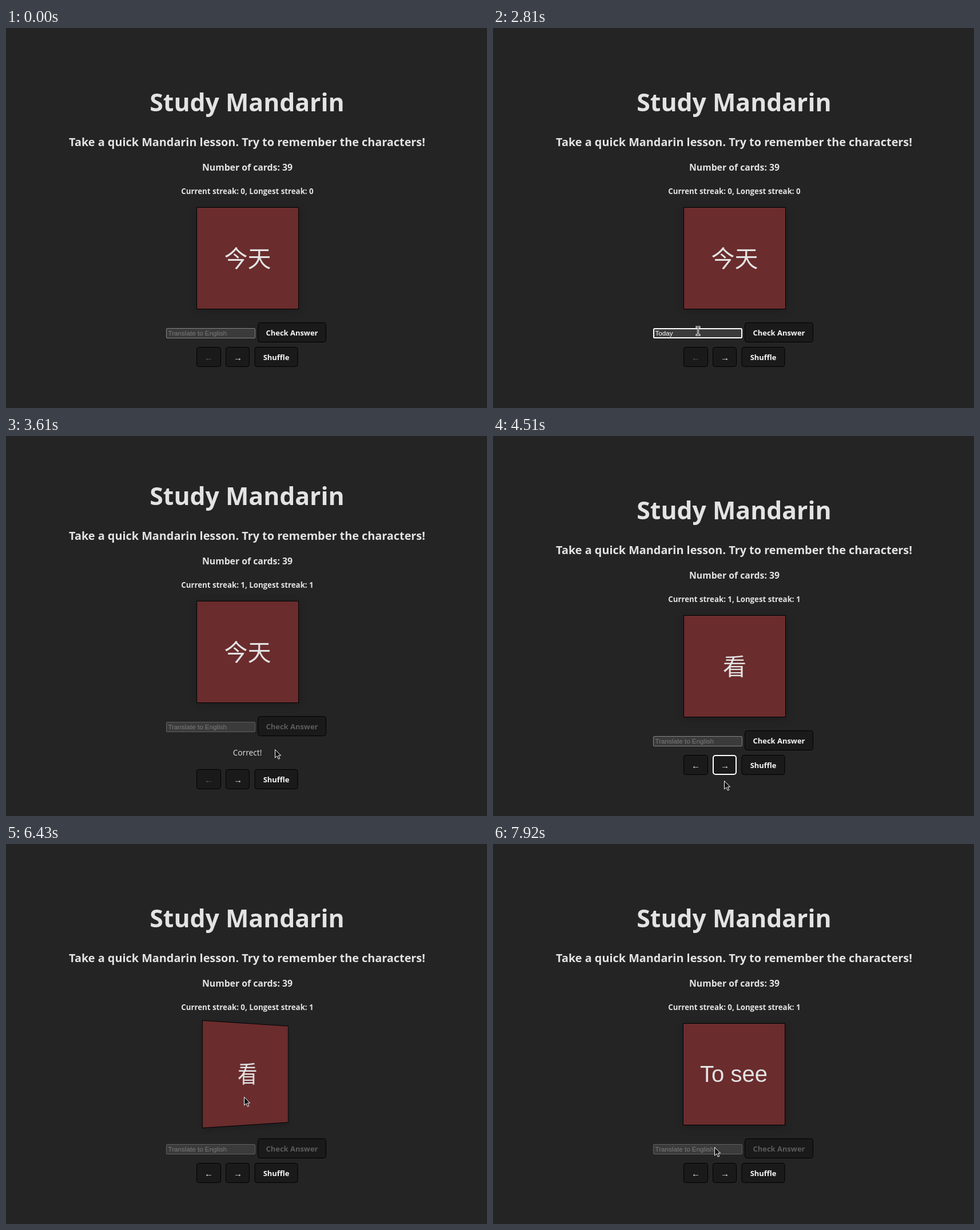
An HTML page that plays this animation: 841 px wide and 666 px high, repeating every 8 s.

```html
<!DOCTYPE html>
<html lang="en">
<head>
<meta charset="utf-8">
<title>Study Mandarin</title>
<style>
  html, body { margin: 0; width: 100%; height: 100%; overflow: hidden; background: #242425; }
  .layer { position: absolute; left: 0; top: 0; width: 841px; height: 666px; overflow: hidden; }
  text { font-family: "Open Sans", "Noto Sans", sans-serif; text-anchor: middle; fill: #e3e3e3; }
  .head text { font-weight: 700; }
  .button rect { fill: #1a1a1a; stroke: #000; }
  .button text { font-weight: 700; font-size: 12.95px; fill: #f8f8f8; }
  .button .arrow { font: 700 15px "Liberation Sans", Arial, sans-serif; }
  .button.off text { fill: #5c5c5e; }
  .button.ring rect { x: 385px; y: 560px; width: 40px; height: 33px; stroke: #fff; stroke-width: 2; }
  #field rect { fill: #3b3b3b; stroke: #858585; }
  #field.off rect { stroke: #606060; }
  #field.focus rect { x: 281px; y: 527px; width: 154px; height: 16px; stroke: #fff; stroke-width: 2; }
  #field text { font: 11.67px "Liberation Sans", Arial, sans-serif; text-anchor: start; fill: #fff; }
  #field text.hint { fill: #7b7b7b; }
  #scene { position: absolute; left: 333px; top: 314px; width: 178px; height: 179px; perspective: 875px; }
  #card { width: 100%; height: 100%; transform-style: preserve-3d; }
  .face { position: absolute; left: 0; top: 0; box-sizing: border-box; width: 179px; height: 179px;
    background: #6a2c2d; border: 1px solid #000; box-shadow: 0 3px 14px rgba(0, 0, 0, .2);
    backface-visibility: hidden; }
  .back { transform: rotateY(180deg); }
  .front text { font: 500 41px "Noto Sans CJK SC", "Noto Sans CJK", "Noto Sans CJK JP", sans-serif; }
  .back text { font: 40px "Liberation Sans", Arial, sans-serif; }
</style>
</head>
<body>
<div class="layer" id="upper">
  <svg class="layer" viewBox="0 0 841 666">
    <g class="head">
      <text x="421.5" y="146" font-size="42.75">Study Mandarin</text>
      <text x="421.5" y="206.5" font-size="19.84">Take a quick Mandarin lesson. Try to remember the characters!</text>
      <text x="422" y="250" font-size="15.78">Number of cards: 39</text>
      <text x="422" y="290.5" font-size="13.25" id="streak"></text>
    </g>
    <g id="field">
      <rect x="280.5" y="526.5" width="155" height="17" rx="1.5"/>
      <text x="283.5" y="539" id="entry"></text>
      <line id="caret" y1="528" y2="542" stroke="#fff"/>
    </g>
    <g class="button" id="check">
      <rect x="440.5" y="516.5" width="119" height="34" rx="4"/>
      <text x="500" y="539">Check Answer</text>
    </g>
  </svg>
  <div id="scene">
    <div id="card">
      <svg class="face front" viewBox="1 1 177 177"><text x="89.5" y="104.5" id="word"></text></svg>
      <svg class="face back" viewBox="1 1 177 177"><text x="89" y="103">To see</text></svg>
    </div>
  </div>
</div>
<svg class="layer" viewBox="0 0 841 666">
  <text x="422" y="560" font-size="13.75" id="verdict">Correct!</text>
  <g id="nav">
    <g class="button" id="prev">
      <rect x="333.5" y="559.5" width="42" height="34" rx="4"/>
      <text class="arrow" x="354.5" y="582.5">←</text>
    </g>
    <g class="button" id="next">
      <rect x="384.5" y="559.5" width="41" height="34" rx="4"/>
      <text class="arrow" x="405.5" y="582.5">→</text>
    </g>
    <g class="button">
      <rect x="435" y="559.5" width="75" height="34" rx="4"/>
      <text x="472.5" y="582">Shuffle</text>
    </g>
  </g>
</svg>
<svg class="layer" viewBox="0 0 841 666">
  <g id="cursor">
    <path id="pointer" d="M.5 .5V15L4 11.8 6.3 17.2 8.7 16.2 6.4 10.9H10.6Z" fill="#111" stroke="#fff"/>
    <g id="beam" fill="none">
      <path d="M-3.5 -7H4.5M-3.5 7H4.5M.5 -7V7" stroke="#fff" stroke-width="3"/>
      <path d="M-2.5 -7H3.5M-2.5 7H3.5M.5 -7V7" stroke="#111"/>
    </g>
    <path id="hand" d="M-1.5 11V1.5Q0 -1 1.5 1.5V7L9 9Q11 10 10.5 13L9 19H1L-5 12Q-5 9 -1.5 11Z" fill="#111" stroke="#fff"/>
  </g>
</svg>
<script>
const LOOP = 8000, SHIFT = 25;
const $ = id => document.getElementById(id);
const within = (t, ...spans) => spans.some(([a, b]) => t >= a && t < b);
const show = (id, on) => { $(id).style.display = on ? "" : "none"; };

// time, x, y, shape from that time on
const path = [
  [260, 752, 655, "pointer"], [640, 440, 556, "pointer"], [800, 358, 531, "beam"],
  [2870, 358, 531, "beam"], [2990, 438, 533, "hand"], [3150, 480, 535, "hand"],
  [3400, 480, 535, "pointer"], [3610, 470, 549, "pointer"], [3890, 412, 594, "hand"],
  [3960, 404, 604, "hand"], [4510, 404, 604, "pointer"], [4970, 404, 604, "pointer"],
  [5370, 357, 544, "pointer"], [5500, 358, 537, "beam"], [5950, 358, 537, "beam"],
  [6020, 368, 520, "pointer"], [6290, 416, 443, "pointer"], [7260, 416, 443, "pointer"],
  [7650, 387, 531, "pointer"], [LOOP, 387, 531, "pointer"]
];
const keys = [[1790, "T"], [1920, "To"], [2120, "Tod"], [2190, "Toda"], [2260, "Today"]];

const flip = $("card").animate(
  [{ transform: "rotateY(0deg)" }, { transform: "rotateY(180deg)" }],
  { delay: 6312, duration: 800, easing: "ease", fill: "both" });
flip.pause();

function moveCursor(t) {
  const i = path.findLastIndex(p => p[0] <= t);
  show("cursor", i >= 0);
  if (i < 0) return;
  const [t0, x0, y0, shape] = path[i];
  const [t1, x1, y1] = path[i + 1];
  const u = (t - t0) / (t1 - t0), e = u * u * (3 - 2 * u);
  const x = Math.round(x0 + (x1 - x0) * e), y = Math.round(y0 + (y1 - y0) * e);
  $("cursor").setAttribute("transform", `translate(${x} ${y})`);
  for (const id of ["pointer", "beam", "hand"]) show(id, id === shape);
}

function drawField(t, off) {
  const typed = t < 3400 ? keys.findLast(k => k[0] <= t)?.[1] ?? "" : "";
  const focus = within(t, [940, 3400], [5700, 6300]);
  const entry = $("entry"), caret = $("caret");
  $("field").setAttribute("class", off ? "off" : focus ? "focus" : "");
  entry.textContent = typed || "Translate to English";
  entry.setAttribute("class", typed ? "" : "hint");
  show("caret", within(t, [940, 1460], [1790, 2810], [5700, 6200]));
  const x = 283.5 + (typed ? Math.round(entry.getComputedTextLength()) : 0);
  caret.setAttribute("x1", x);
  caret.setAttribute("x2", x);
}

function draw(t) {
  const correct = within(t, [3400, 4510]);
  const off = correct || t >= 6300;
  const second = t >= 4510;
  const now = within(t, [3400, 6300]) ? 1 : 0;
  $("upper").style.top = correct ? -SHIFT + "px" : 0;
  $("nav").setAttribute("transform", `translate(0 ${correct ? SHIFT : 0})`);
  show("verdict", correct);
  $("streak").textContent = `Current streak: ${now}, Longest streak: ${t < 3400 ? 0 : 1}`;
  $("word").textContent = second ? "看" : "今天";
  $("check").classList.toggle("off", off);
  $("prev").classList.toggle("off", !second);
  $("next").classList.toggle("ring", within(t, [4380, 5700]));
  drawField(t, off);
  flip.currentTime = t;
  moveCursor(t);
}

const start = performance.now();
function tick() {
  draw((performance.now() - start) % LOOP);
  requestAnimationFrame(tick);
}
tick();
</script>
</body>
</html>
```
